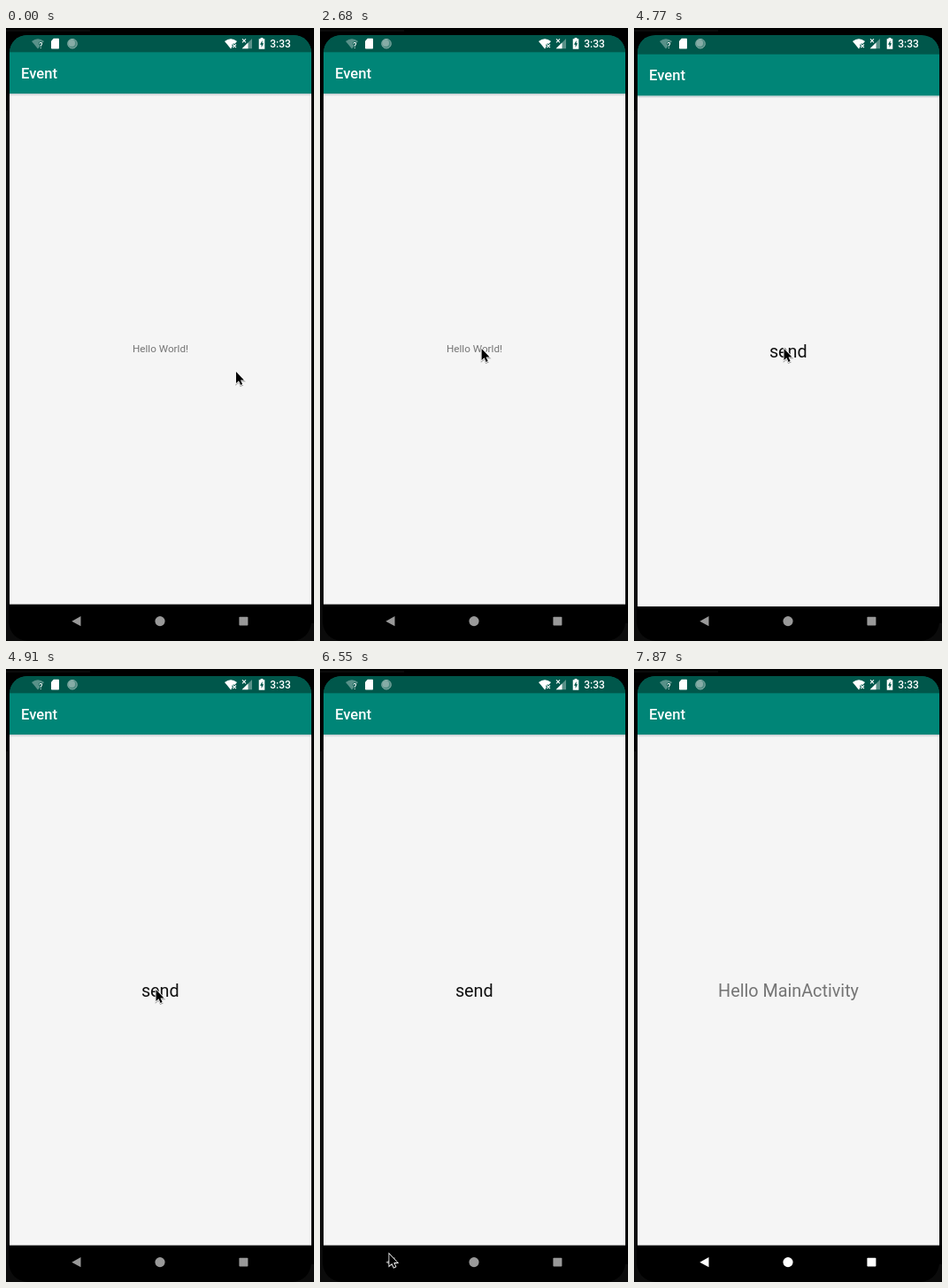
An HTML page for the animation above (8710 ms loop, 348 by 692 pixels).

```html
<!DOCTYPE html>
<html lang="en">
<head>
<meta charset="utf-8">
<title>Event</title>
<style>
  html, body { margin: 0; width: 100%; height: 100%; overflow: hidden; background: #000; }
  svg { display: block; width: 348px; height: 692px; font-family: Roboto, sans-serif; }
  .label { text-anchor: middle; font-size: 19.8px; fill: #757575; }
  .small { font-size: 11.7px; }
  .dark { fill: #111; }
  .medium { font-weight: 500; fill: #fff; }
</style>
</head>
<body>
<svg viewBox="0 0 348 692">
  <defs>
    <clipPath id="screen"><rect x="4" y="8" width="341" height="682" rx="20"/></clipPath>
    <linearGradient id="shade" x2="0" y2="1">
      <stop stop-color="#c0c8cc"/><stop offset="1" stop-color="#f5f5f5"/>
    </linearGradient>
    <path id="fan" d="M0 3Q7-2.6 14 3L7 11.5Z"/>
  </defs>

  <rect width="348" height="692"/>
  <path d="M0 2H95V4H0ZM0 93H3V692H0ZM3 672Q6 690 24 692H3ZM345 672Q342 690 324 692H348V672Z" fill="#0b0b0b"/>

  <g clip-path="url(#screen)">
    <rect x="4" y="8" width="341" height="24" fill="#00574b"/>
    <g id="app">
      <rect x="4" y="8" width="341" height="20" fill="#00574b"/>
      <rect x="4" y="73" width="341" height="577.6" fill="#f5f5f5"/>
      <rect x="4" y="74" width="341" height="3" fill="url(#shade)"/>
      <rect x="4" y="27.3" width="341" height="46.7" fill="#008577"/>
      <text class="medium" x="17" y="57" font-size="16.6">Event</text>
      <text id="hello" class="label small" x="174.5" y="366.4">Hello World!</text>
      <text id="send" class="label dark" x="174.3" y="369.8">send</text>
      <text id="reply" class="label" x="174.5" y="369.8">Hello MainActivity</text>
    </g>
    <rect id="pill" x="35" y="651" width="90" height="38.5" rx="19" fill="#151515"/>
    <g id="nav">
      <path d="M74.3 669.7L84.5 664V675.3Z"/>
      <circle cx="174" cy="669.6" r="5.6"/>
      <rect x="263.4" y="664.8" width="10" height="9.8" rx=".8"/>
    </g>
  </g>

  <g fill="#fff">
    <use href="#fan" x="29" y="12" opacity=".35"/>
    <text class="medium" x="37.3" y="22.6" font-size="8.5" stroke="#00574b" stroke-width="1.4" paint-order="stroke">?</text>
    <path d="M53.8 11.8H59.2Q60 11.8 60 12.6V22.7Q60 23.5 59.2 23.5H51.8Q51 23.5 51 22.7V14.8Z"/>
    <circle cx="75" cy="17.7" r="5.3" fill="#4c8a80" stroke="#86aca6"/>
    <circle cx="74.2" cy="16.9" r="3.9" fill="#86aca6"/>
    <use href="#fan" x="247" y="12"/>
    <path d="M256 18.2L260.3 22.5M260.3 18.2L256 22.5" stroke="#00574b" stroke-width="3"/>
    <path d="M256.3 18.5L260 22.2M260 18.5L256.3 22.2M267 12.3L271 16.3M271 12.3L267 16.3" stroke="#fff" stroke-width="1.1"/>
    <path d="M278 12V23.3H266.7Z" opacity=".35"/>
    <path d="M273.5 16.5V23.3H266.7Z"/>
    <path d="M287.6 11H290.4V12.2H292.3V23.7H285.7V12.2H287.6Z"/>
    <path d="M289.6 14L287 18.7H288.6V22L291.1 17.2H289.6Z" fill="#00574b"/>
    <text class="medium" x="298.3" y="22" font-size="12">3:33</text>
  </g>

  <path id="cursor" d="M1 1V14L4 11.3L6.1 16L8.1 15.1L6 10.5H10Z"
        stroke="#fff" stroke-width="1.6" paint-order="stroke" style="filter: drop-shadow(0 1px .6px #0006)"/>
</svg>
<script>
const LOOP = 8710, TICK = 146;
const $ = id => document.getElementById(id);
const show = (id, on) => $(id).setAttribute('visibility', on ? 'visible' : 'hidden');

// Pointer gestures: curved strokes that advance once per tick; `power` sets the ease-out
const origin = { x: 259, y: 387 };
const gestures = [
  { start: 150, ticks: 6, power: 2, bend: { x: 221, y: 370 }, to: { x: 183, y: 362 } },
  { start: 2230, ticks: 1, power: 1, bend: { x: 182, y: 361 }, to: { x: 181.6, y: 361 } },
  { start: 4170, ticks: 2, power: 1, bend: { x: 175, y: 361 }, to: { x: 168.5, y: 361 } },
  { start: 5810, ticks: 8, power: 3, bend: { x: 149, y: 618 }, to: { x: 75, y: 661 } },
  { start: 7430, ticks: 4, power: 1, bend: { x: 228, y: 595 }, to: { x: 381, y: 706 } }
];

const curve = (a, b, c, u) => (1 - u) ** 2 * a + 2 * u * (1 - u) * b + u * u * c;

function pointerAt(t) {
  let pos = origin;
  for (const { start, ticks, power, bend, to } of gestures) {
    if (t < start) break;
    const progress = Math.min(1, (Math.floor((t - start) / TICK) + 1) / ticks);
    const u = 1 - (1 - progress) ** power;
    pos = { x: curve(pos.x, bend.x, to.x, u), y: curve(pos.y, bend.y, to.y, u) };
  }
  return pos;
}

function draw() {
  const t = performance.now() % LOOP;
  const opened = t >= 4770, pressed = t >= 6840, closed = t >= 6990;
  const opening = opened && t < 4910, closing = pressed && !closed;

  show('hello', !opened);
  show('send', opened && !closed);
  show('reply', closed);
  show('pill', closing);
  $('nav').setAttribute('fill', pressed ? '#fff' : '#999');
  $('app').setAttribute('transform', `translate(0 ${opening ? 2.4 : closing ? 1 : 0})`);

  const { x, y } = pointerAt(t);
  $('cursor').setAttribute('transform', `translate(${x} ${y})`);
  requestAnimationFrame(draw);
}
draw();
</script>
</body>
</html>
```
